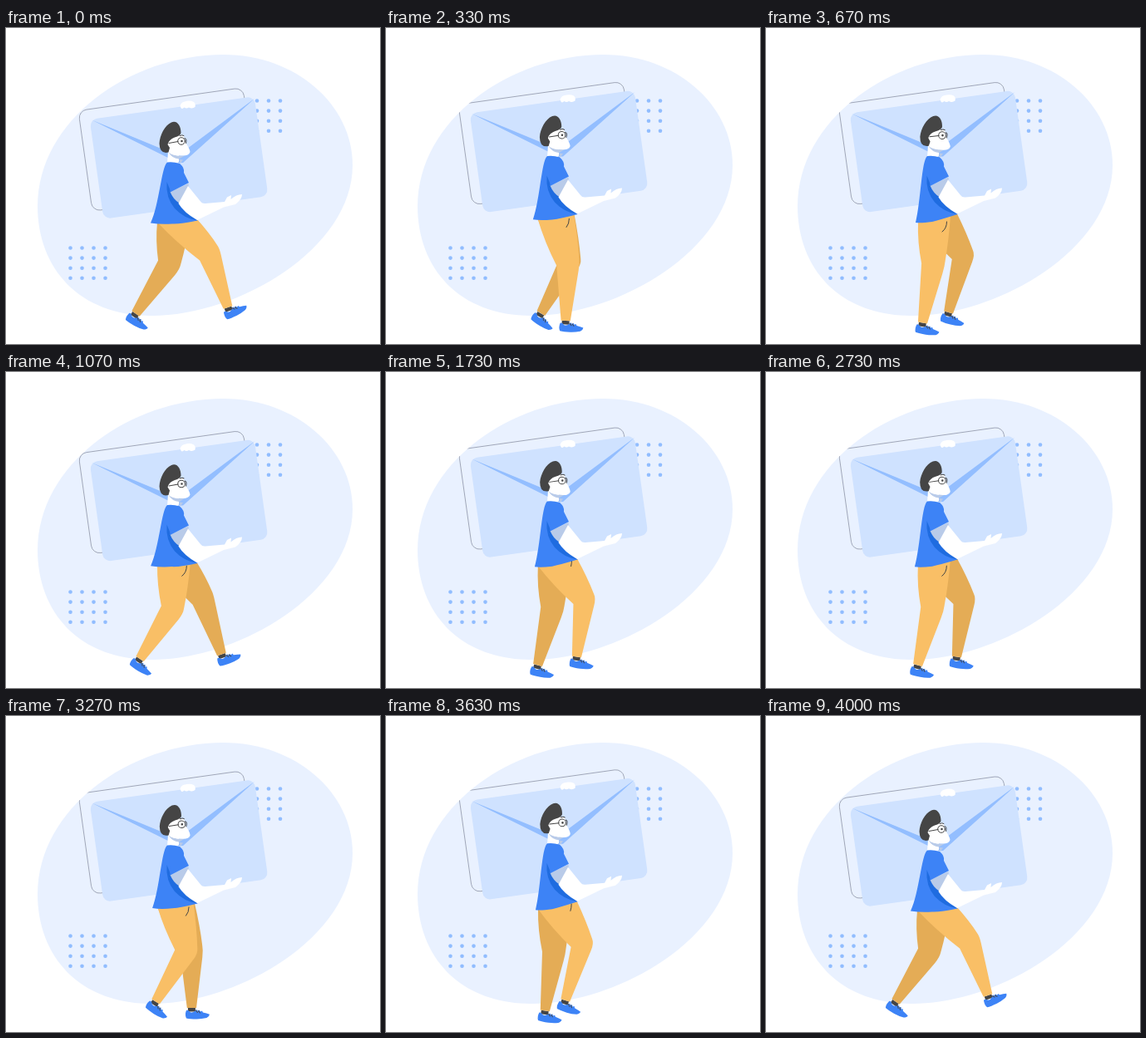
Animation, 450 px wide and 380 px high, one loop 4030 ms. Source, as an HTML page:

```html
<!DOCTYPE html>
<html lang="en">
<head>
<meta charset="utf-8">
<title>Carrying a letter</title>
<style>
  html, body { margin: 0; width: 100%; height: 100%; overflow: hidden; background: #fff; }
  svg { display: block; width: 450px; height: 380px; }
  .sky { fill: #e9f1ff; }
  .dot { fill: #91bdff; }
  .paper { fill: #cfe2ff; }
  .flap { fill: #93beff; }
  .skin { fill: #fff; }
  .shade { fill: #b9cbe9; }
  .shirt { fill: #3d83f6; }
  .fold { fill: #1f6ce0; }
  .ink { fill: #454545; }
  .line { fill: none; stroke: #454545; stroke-width: 1; stroke-linecap: round; }
  .outline { fill: none; stroke: #8d93a5; stroke-width: .75; }
  .near .cloth { fill: #f9bf66; }
  .far .cloth { fill: #e4ac56; }
</style>
</head>
<body>
<svg viewBox="0 0 450 380">
  <defs>
    <path id="blob" d="M262 32C348 32 417 92 417 165C417 265 280 346 175 346C88 346 38 289 38 214C38 112 148 32 262 32Z"/>
    <clipPath id="inside"><use href="#blob"/></clipPath>
    <g id="shoe">
      <path class="shirt" d="M-6.5 -1.5Q-4 -2.5 -2 .5Q1 2 4.5 -1L6.5 -2.5L7.5 -.5L9.5 -2L10.5 0L12.5 -1L13.5 1Q18 2 21.5 3.2Q21.500 5.500 18 7.500Q12 9 6 9Q-2 9 -6.500 8Q-8.500 4 -6.500 -1.500Z"/>
      <path class="line" d="M5 -1.500L7 1M8 -1L10 1.500"/>
    </g>
  </defs>

  <use href="#blob" class="sky"/>
  <g id="dots"></g>

  <g clip-path="url(#inside)">
    <g class="bob">
      <rect class="outline" x="-100" y="-61" width="200" height="122" rx="10" transform="translate(194.5 146) rotate(-8)"/>
    </g>
  </g>
  <g class="bob">
    <rect class="paper" x="-100" y="-60" width="200" height="121" rx="9" transform="translate(208 155.5) rotate(-8)"/>
    <path class="flap" d="M103 110.500L200 150.500L212 149.500L299.500 84.500L213 162H207Z"/>
    <path class="skin" d="M209.500 93.500Q211 89 215 88.500Q221 86.500 226 89Q228.500 91 227.500 95Q224 97.500 220 95.500Q217 97.500 214.500 95.500Q212 98 210.500 96Z"/>
  </g>

  <g class="leg far">
    <path class="ink sock"/><use href="#shoe"/><path class="cloth"/>
  </g>
  <g class="leg near">
    <path class="ink sock"/><use href="#shoe"/><path class="cloth"/>
  </g>
  <path id="pocket" class="line"/>

  <g class="bob">
    <path class="skin" d="M195 148L208 151V161Q203 166 194 163Z"/>
    <path class="shade" d="M195.500 149.500Q203 155 215 153.500L208 157.500Q200 157 195.500 149.500ZM208 158L213 158.500L210 163Z"/>
    <path id="shirt" class="shirt"/>
    <path class="fold" d="M193.500 185Q192 204 203 217Q214 229 230.500 231.500Q215 219 198 196Z"/>
    <path class="shade" d="M197.500 197L219.500 187L220 193L209 211Q201 206 197.500 197Z"/>
    <path class="skin" d="M219 190L234 208.500Q236 211.500 240 211L263 209L266 203.500L271 201L270.500 206Q277 200 284 200Q284 206 276 212L262 215.500L230 231Q214 222 207.500 211Z"/>
    <path class="shirt" d="M196 163L209 163Q215 168 214 174L220 186L197.500 197.500Z"/>
    <g id="head">
      <path class="skin" d="M194 138Q203 125 214 130L216 138Q221 145 221.500 149Q220 153.500 213 153.500Q200 154 195 148Z"/>
      <path class="ink" d="M184.500 139C185 129 191 117 199 113.500C206 110.500 210.500 118 210.500 126Q210 129.500 203 131.500Q196 134 194.500 140L197 144L195.500 149.500Q185 152 184.500 139Z"/>
      <path class="line" d="M196 138.500L207 136.500M209 129.500Q212 128 214 129.500M215 132.500Q218 133 216.500 138.500"/>
      <circle class="line" cx="211" cy="136" r="4.300"/>
      <circle class="ink" cx="211.500" cy="136" r="1.300"/>
    </g>
  </g>
</svg>

<script>
const FRAME = 1000 / 30, LOOP = 4030, STEPS = 60;
const $ = (q, root = document) => root.querySelector(q);

// phase, knee x, knee y, hem x, hem y, shoe angle
const gait = [
  [0, 245, 272, 267, 336, -26],
  [.033, 237, 273, 259.5, 339.5, -20],
  [.133, 223.5, 284, 223.5, 351, 0],
  [.333, 201, 285, 188.5, 354.5, 9],
  [.367, 200, 285, 182.5, 352.5, 11],
  [.5, 196, 285, 156, 343.5, 29],
  [.533, 200, 286, 161, 345, 32],
  [.633, 217, 283.5, 180, 343.5, 33],
  [.833, 237.5, 275.5, 219.5, 342, 15],
  [.867, 239, 275.5, 229.5, 342.5, 8]
];
// step phase, lean of the back and shirt tail
const lean = [[0, 0], [.067, .02], [.267, .35], [.667, 1], [.733, .82]];

// cyclic monotone cubic interpolation over rows of keys
function sample(keys, p) {
  const n = keys.length;
  const key = (i, c) => keys[(i + n) % n][c] + (c ? 0 : Math.floor(i / n));
  const slope = (i, c) => (key(i + 1, c) - key(i, c)) / (key(i + 1, 0) - key(i, 0));
  const tangent = (i, c) => {
    const a = slope(i - 1, c), b = slope(i, c);
    return a * b > 0 ? 2 * a * b / (a + b) : 0;
  };
  let i = n - 1;
  while (keys[i][0] > p) i--;
  const h = key(i + 1, 0) - key(i, 0), u = (p - key(i, 0)) / h, v = 1 - u;
  return keys[0].slice(1).map((_, j) => {
    const c = j + 1;
    return v * v * (1 + 2 * u) * key(i, c) + u * u * (3 - 2 * u) * key(i + 1, c)
      + h * u * v * (v * tangent(i, c) - u * tangent(i + 1, c));
  });
}

const add = (a, b, k = 1) => [a[0] + b[0] * k, a[1] + b[1] * k];
const mix = (a, b, k) => [a[0] + (b[0] - a[0]) * k, a[1] + (b[1] - a[1]) * k];
const unit = (a, b) => {
  const d = Math.hypot(b[0] - a[0], b[1] - a[1]);
  return [(b[0] - a[0]) / d, (b[1] - a[1]) / d];
};
const front = d => [d[1], -d[0]];
const pt = a => a.map(v => v.toFixed(2)).join(' ');

function drawLeg(leg, phase, hipBack, hipY) {
  const [kx, ky, ax, ay, angle] = sample(gait, phase);
  const knee = [kx, ky], hem = [ax, ay];
  const thigh = unit([206, 233], knee), shin = unit(knee, hem);
  const across = front(unit([0, 0], add(thigh, shin))), side = front(shin);
  const reach = Math.min(1, Math.max(0, (kx - 200) / 40));
  const hipFront = [222 + 8 * reach, hipY];
  const kneeBack = add(knee, across, -14), kneeFront = add(knee, across, 14);
  const hemBack = add(hem, side, -5.6), hemFront = add(hem, side, 5.6);
  const bulge = add(mix(hipBack, kneeBack, .5), across, -3);
  const bulgeFront = add(mix(hipFront, kneeFront, .5), across, 1.5);
  const joint = add(hem, shin, 4.5);

  $('.cloth', leg).setAttribute('d',
    `M${pt(hipBack)}Q${pt(bulge)} ${pt(kneeBack)}L${pt(hemBack)}L${pt(hemFront)}` +
    `L${pt(mix(kneeFront, hemFront, .12))}Q${pt(kneeFront)} ${pt(mix(kneeFront, hipFront, .1))}` +
    `Q${pt(bulgeFront)} ${pt(hipFront)}L206 ${hipY - 8}Z`);
  $('.sock', leg).setAttribute('d',
    `M${pt(add(hem, side, -4.5))}L${pt(add(hem, side, 4.5))}` +
    `L${pt(add(joint, side, 4.5))}L${pt(add(joint, side, -4.5))}Z`);
  $('use', leg).setAttribute('transform', `translate(${pt(joint)}) rotate(${angle.toFixed(2)})`);
  return kx;
}

function draw(time) {
  const frame = Math.floor((time % LOOP + 5) / FRAME);
  const phase = frame % STEPS / STEPS, step = phase * 2 % 1;
  const bob = -11.2 * (1 - Math.abs(1 - 2 * step));
  const [w] = sample(lean, step);

  document.querySelectorAll('.bob').forEach(g =>
    g.setAttribute('transform', `translate(0 ${bob.toFixed(2)})`));
  $('#head').setAttribute('transform', `rotate(${3 * w} 200 155)`);

  const tail = [174 + 6 * w, 234.5 + 7 * w];
  $('#shirt').setAttribute('d',
    `M194 161.500Q201 160.500 209 163L214 185L198 196L230.500 231.500` +
    `Q${pt([210, 236 + 2 * w])} ${pt([200, 235.5 + 5 * w])}Q${pt([186, 236.5 + 6 * w])} ${pt(tail)}` +
    `C${pt([184.5 + 2 * w, 212 + 3 * w])} 187 167 194 161.500Z`);

  const hip = [182 + w, tail[1] + bob - 1], hipY = 230 + bob;
  drawLeg($('.far'), (phase + .5) % 1, hip, hipY);
  const kx = drawLeg($('.near'), phase, hip, hipY);

  const d = kx - 201, endX = 212 + .28 * d, endY = 245 - .3 * d;
  $('#pocket').setAttribute('d',
    `M${pt([217.5 + .16 * d, 233 - .2 * d])}Q${pt([217.5 + .16 * d, endY - 4])} ${pt([endX, endY])}`);
  $('#pocket').style.opacity = kx > 241 ? 0 : 1;
}

function addDots(x, y) {
  for (let i = 0; i < 16; i++) {
    const c = document.createElementNS('http://www.w3.org/2000/svg', 'circle');
    const at = { class: 'dot', cx: x + i % 4 * 14, cy: y + (i >> 2) * 12.1, r: 2.3 };
    for (const k in at) c.setAttribute(k, at[k]);
    $('#dots').append(c);
  }
}
addDots(77.5, 264.5);
addDots(288, 87.5);

const start = performance.now();
function tick() {
  draw(performance.now() - start);
  requestAnimationFrame(tick);
}
tick();
</script>
</body>
</html>
```
